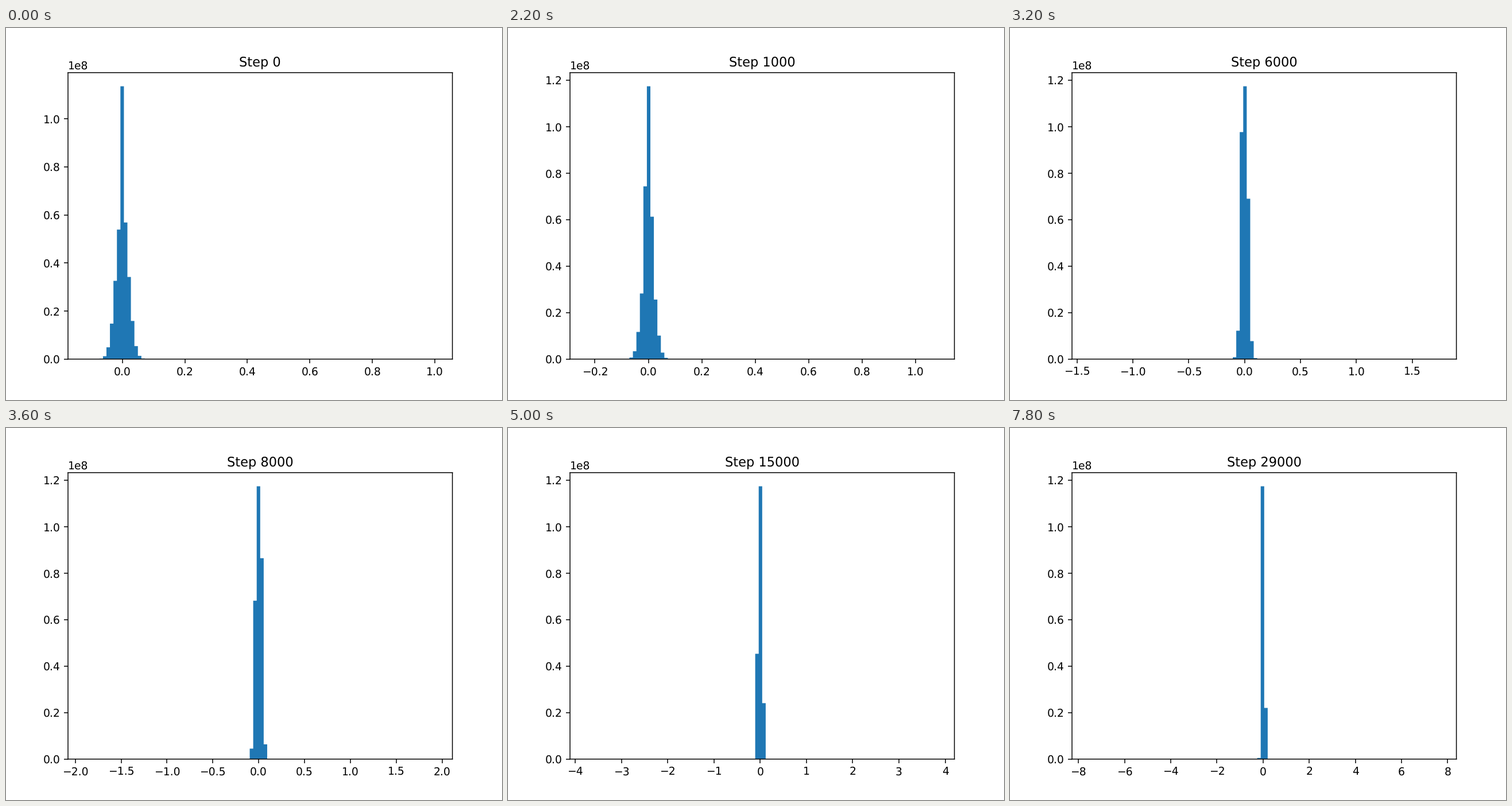
Write a matplotlib script that moves like this. It is 864 by 648 pixels and loops after 8 s.

```python
import math

import matplotlib.pyplot as plt
import numpy as np
from matplotlib.animation import FuncAnimation

plt.rcParams["path.snap"] = False
plt.rcParams["text.hinting"] = "none"

FRAMES = 40
BINS = 100
CHUNK = 405.2e6 / 7   # weights counted by each of the 7 workers
CAP = 2.0 ** 24       # float32 counters stop growing here

# Share of narrow (output layer) weights per chunk at the start of training
START_SHARE = np.array([1.05] + [24.1] * 5 + [4.19]) * 1e6 / CHUNK

# Extreme weights at a few points of training (thousands of steps)
KNOTS = [0.5, 4, 8, 15, 22, 29]
LOWEST = [-0.1178, -0.8883, -1.8888, -3.7357, -5.6298, -7.5205]
HIGHEST = [1.0, 1.5544, 1.9227, 3.8213, 5.7352, 7.6195]


def step_at(i):
    """Checkpoints double up to 512, then come every 1000 steps."""
    if i == 0:
        return 0
    return 2 ** (i - 1) if i <= 10 else 1000 * (i - 10)


def normal_mass(edges, sigma):
    cdf = [0.5 * (1 + math.erf(x / (sigma * math.sqrt(2)))) for x in edges]
    return np.diff(cdf)


def histogram(step):
    """Two groups of normal weights that widen and even out in training."""
    k = step / 1000
    grown = 1 - math.exp(-k * k)
    narrow = math.hypot(0.0026, 0.029 * k / (k + 4.85))
    wide = math.hypot(0.01976, 0.013 * k ** 0.25 * grown)
    share = (START_SHARE + (0.5 - START_SHARE) * grown)[:, None]

    edges = np.linspace(np.interp(k, KNOTS, LOWEST),
                        np.interp(k, KNOTS, HIGHEST), BINS + 1)
    mass = share * normal_mass(edges, narrow) + (1 - share) * normal_mass(edges, wide)
    return edges, np.minimum(CHUNK * mass, CAP).sum(axis=0)


fig, ax = plt.subplots(figsize=(6.4, 4.8), dpi=135)


def draw(i):
    step = step_at(i)
    edges, counts = histogram(step)
    ax.clear()
    ax.stairs(counts, edges, fill=True, color="#1f77b4")
    ax.set_title(f"Step {step}")
    return []


anim = FuncAnimation(fig, draw, frames=FRAMES, init_func=lambda: draw(0),
                     interval=200, repeat=True, repeat_delay=0, blit=False)
plt.show()
```
